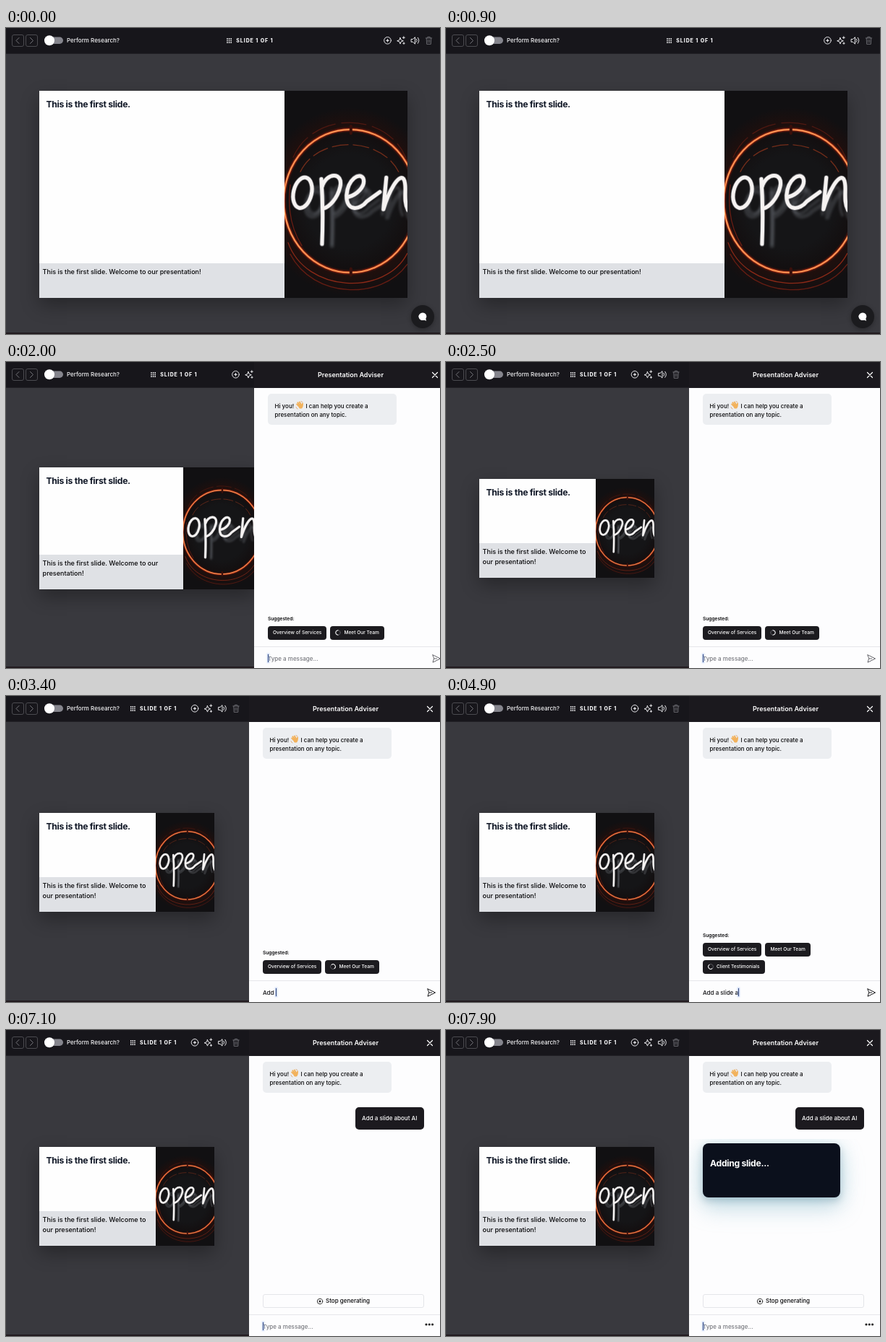
Recreate the animation shown at these times as an HTML page. Size 600 by 424 pixels, loop 8000 ms.

```html
<!DOCTYPE html>
<html lang="en">
<head>
<meta charset="utf-8">
<title>Slide editor with chat panel</title>
<style>
html, body { margin: 0; width: 100%; height: 100%; overflow: hidden; }
body { background: #39393e; font: 450 8px/12px Inter, "Liberation Sans", sans-serif; color: #08080a; }
#stage { position: absolute; left: 0; top: 0; width: 600px; height: 424px; overflow: hidden; background: #39393e; }
#stage div, #stage svg.abs { position: absolute; white-space: nowrap; }
svg { fill: none; stroke-linecap: round; stroke-linejoin: round; overflow: visible; }
#bar { left: 0; top: 0; width: 600px; height: 35px; background: #17161b; border-bottom: 1px solid #222126; color: #f4f4f6; }
.nav { top: 9px; width: 15px; height: 15px; border: 1px solid #4b4b50; border-radius: 3px; }
#count { left: 318.3px; top: 11.6px; font-weight: 800; font-size: 7px; letter-spacing: .92px; }
#grid { fill: #f4f4f6; }
#dots { fill: #222; }
#slide { left: 45.6px; background: #fefefe; box-shadow: 0 10px 24px rgba(0, 0, 0, .32); }
.title { font-weight: 700; font-size: 12.2px; line-height: 16px; letter-spacing: -.025em; }
#slide .title { left: 9.8px; top: 11px; color: #111827; }
#slide .caption { left: 0; bottom: 0; width: 66.67%; height: 48px; box-sizing: border-box; padding: 5px; background: #dfe1e5; font-size: 9.05px; line-height: 14.4px; white-space: normal; }
#photo { right: 0; top: 0; width: 33.33%; height: 100%; overflow: hidden; background: #0c0b0d; }
#photo svg { position: absolute; width: 100%; height: 100%; }
#floor { left: 0; top: 422px; width: 600px; height: 2px; background: #211a1e; }
#chat { left: 560px; top: 384px; width: 32px; height: 32px; border-radius: 50%; background: #1b1b1e; box-shadow: 0 2px 6px rgba(0, 0, 0, .3); }
#panel { left: 336px; top: 0; width: 267px; height: 424px; background: #fdfdfe; }
#head { left: 0; top: 0; width: 267px; height: 36px; background: #1b191e; color: #fff; font-weight: 600; font-size: 9px; line-height: 35px; text-align: center; }
#hello { left: 19px; top: 44px; width: 178px; height: 43px; border-radius: 5px; background: #eceef1; }
#hello p { margin: 10px 0 0 9.5px; }
#hello svg { vertical-align: -2.5px; }
#suggest { left: 19px; bottom: 39.5px; width: 225px; font-size: 6.6px; }
#suggest b { display: block; font-weight: 600; line-height: 10px; margin-bottom: 4.5px; }
#stage #chips { position: static; display: flex; flex-wrap: wrap; gap: 5px; }
.chip { display: flex; align-items: center; height: 19px; padding: 0 7px; border-radius: 4px; background: #1c1b1f; color: #fff; font-weight: 500; }
.chip svg { margin-right: 4px; }
#line { left: 0; top: 394px; width: 267px; height: 1px; background: #e6e7ea; }
#input { left: 19px; top: 404.5px; white-space: pre !important; }
#caret { top: 405px; width: 1px; height: 11px; background: #3c4b78; box-shadow: 0 0 2px 1px rgba(120, 160, 240, .5); }
#ask { left: 146.5px; top: 107px; width: 95.5px; height: 31px; border-radius: 5px; background: #1c1a1f; color: #fff; line-height: 31px; text-align: center; }
#clip { left: 0; top: 151px; width: 264px; height: 160px; overflow: hidden; }
#card { left: 19px; top: 6px; width: 190px; height: 75px; border-radius: 8px; background: #0b101c; color: #fff; }
#card .title { left: 10px; top: 20px; }
#stop { left: 19px; top: 366px; width: 221px; height: 17px; border: 1px solid #e4e5e9; border-radius: 3px; font-weight: 500; line-height: 17px; }
#stop span { position: absolute; left: 86px; }
</style>
</head>
<body>
<div id="stage">
  <div id="bar">
    <div class="nav" style="left:8px"></div>
    <div class="nav" style="left:27px"></div>
    <svg class="abs" width="90" height="36" stroke="#77777d" style="left:0;top:0">
      <path d="M18 13.5l-4 4 4 4M33.5 13.5l4 4-4 4"/>
      <rect x="53.5" y="12.5" width="25.5" height="9.5" rx="4.75" fill="#85858d" stroke="none"/>
      <circle cx="60" cy="17.2" r="7" fill="#fff" stroke="none"/>
    </svg>
    <div style="left:84px;top:11px;font-weight:500">Perform Research?</div>
    <div id="middle" style="left:0;top:0">
      <svg class="abs" id="grid" width="8" height="8" style="left:304.5px;top:14px"></svg>
      <div id="count">SLIDE 1 OF 1</div>
    </div>
    <svg class="abs" id="tools" width="600" height="36" stroke="#e9e9ec" style="left:0;top:0">
      <circle cx="527.5" cy="17.3" r="4.8"/>
      <path d="M525.9 17.3h3.2M527.5 15.7v3.2" stroke-width="1.2"/>
      <path d="M545 13.5l1.2 3.1 3.1 1.2-3.1 1.2-1.2 3.1-1.2-3.1-3.1-1.2 3.1-1.2zM549.8 11.8v3M548.3 13.3h3M550 20v2.4M548.8 21.2h2.4"/>
      <path d="M560.5 15.5h2l3-2.8v9.4l-3-2.8h-2zM567.5 15.3q1.6 2 0 4M569.3 13.3q3.2 4 0 8"/>
      <path stroke="#68686e" d="M580.3 14h8.4M582.8 14v-1.6h3.4V14M581.2 14l.5 8.4h5.6l.5-8.4M583.4 16.3v3.8M585.6 16.3v3.8"/>
    </svg>
  </div>

  <div id="slide">
    <div class="title">This is the first slide.</div>
    <div class="caption">This is the first slide. Welcome to our presentation!</div>
    <div id="photo">
      <svg viewBox="0 0 170 287" preserveAspectRatio="none">
        <defs>
          <radialGradient id="dusk"><stop offset=".5" stop-color="#151517"/><stop offset=".72" stop-color="#130f10"/><stop offset=".8" stop-color="#1f0f0d"/><stop offset="1" stop-color="#111012"/></radialGradient>
          <filter id="soft"><feGaussianBlur stdDeviation="1.6"/></filter>
          <g id="sign">
            <ellipse cx="25" cy="141" rx="12.5" ry="21.5" transform="rotate(13 25 141)"/>
            <path d="M51 122Q54 165 52 212M52 133C58 112 82 112 77 133C73 150 62 160 54 163M88 147C100 144 113 132 109 121C104 112 88 122 86 144C85 167 104 166 114 153L132 140M141 120L137 164C144 140 158 114 165 122C171 132 163 150 171 165"/>
          </g>
        </defs>
        <path fill="#111012" d="M0 0h170v287H0z"/>
        <ellipse cx="90" cy="153" rx="122" ry="130" fill="url(#dusk)"/>
        <g stroke="#8f2414" stroke-width="1.3">
          <path d="M12 92C40 28 140 28 168 92" stroke-dasharray="34 9" opacity=".45"/>
          <path d="M22 112C46 62 132 62 158 112" stroke="#b5401f" stroke-dasharray="22 7" opacity=".6"/>
          <path d="M5 210C30 280 140 284 170 225" stroke="#a8301a" opacity=".8"/>
          <path d="M8 226C40 288 134 290 170 240" opacity=".65"/>
          <path d="M8 130Q2 180 24 214" opacity=".7"/>
        </g>
        <ellipse cx="91" cy="152.5" rx="92" ry="99" stroke="#7a1c0c" stroke-width="7" opacity=".35"/>
        <ellipse cx="91" cy="152.5" rx="92" ry="99" stroke="#d24a26" stroke-width="3.2"/>
        <ellipse cx="91" cy="152.5" rx="92" ry="99" stroke="#ffb468" stroke-width="1.2"/>
        <path d="M92 49v10M92 246v9" stroke="#3a100b" stroke-width="4"/>
        <g filter="url(#soft)" stroke="#74797f">
          <use href="#sign" stroke-width="7" opacity=".3" transform="translate(19 41) scale(.9 .82)"/>
          <use href="#sign" stroke-width="5" opacity=".3" transform="translate(23 30) scale(.82 .86)"/>
        </g>
        <use href="#sign" stroke="#a9a9ad" stroke-width="6.6" opacity=".5"/>
        <use href="#sign" stroke="#f6f3f2" stroke-width="5"/>
      </svg>
    </div>
  </div>
  <div id="floor"></div>

  <div id="chat">
    <svg class="abs" width="32" height="32" style="left:0;top:0"><path fill="#fff" d="M16 10.5a5.7 5.3 0 1 0 2 10.3l3.2.9-.9-2.7A5.7 5.3 0 0 0 16 10.5z"/></svg>
  </div>

  <div id="panel">
    <div id="head">Presentation Adviser</div>
    <svg class="abs" width="8" height="8" stroke="#fff" stroke-width="1.2" style="left:246px;top:13.5px"><path d="M.5.5l7 7M7.5.5l-7 7"/></svg>
    <div id="hello"><p>Hi you! <svg width="12" height="12" stroke="#f2b25c" stroke-width="2"><path d="M2.2 4.5l4 4M3.4 2.4l4 5M5.8 1.6l3 5M10 3.8l-.4 3.6"/><circle cx="7.4" cy="8" r="2.6" fill="#f2b25c" stroke="none"/><path stroke="#d98f45" stroke-width=".7" d="M8 .6q1.6.4 2.2 1.6M1 8.6q.4 1.6 2 2.4"/></svg> I can help you create a<br>presentation on any topic.</p></div>
    <div id="ask">Add a slide about AI</div>
    <div id="clip"><div id="card"><div class="title">Adding slide...</div></div></div>
    <div id="stop">
      <svg class="abs" width="10" height="10" stroke="#222" style="left:72.5px;top:4px"><circle cx="5" cy="5" r="3.7" stroke-width=".9"/><rect x="3.7" y="3.7" width="2.6" height="2.6" fill="#222" stroke="none"/></svg>
      <span>Stop generating</span>
    </div>
    <div id="suggest"><b>Suggested:</b><div id="chips"></div></div>
    <div id="line"></div>
    <div id="input"></div>
    <div id="caret"></div>
    <svg class="abs" id="send" width="12" height="12" style="left:246px;top:405px"><path d="M1 .8L11.5 6 1 11.2l1.6-5.2zM2.6 6h4"/></svg>
    <svg class="abs" id="dots" width="14" height="4" style="left:242.5px;top:405.5px"><circle cx="2" cy="2" r="1.6"/><circle cx="6.3" cy="2" r="1.6"/><circle cx="10.6" cy="2" r="1.6"/></svg>
  </div>

  <svg class="abs" id="pointer" width="40" height="40" style="left:0;top:0">
    <circle id="halo" r="18" fill="rgba(255,255,255,.04)" stroke="rgba(225,225,230,.35)" stroke-width="1.4"/>
    <path fill="#fff" stroke="#111" stroke-width=".7" d="M-.8 0q.9-.9 1.8 0v3.4l3.2.8q1 .4.8 1.6l-.6 3H.2l-2.4-3.2q-.2-1 1.4-.4z"/>
  </svg>
</div>

<script>
const $ = id => document.getElementById(id);
const LOOP = 8000, STEP = 100;
const MESSAGE = "Add a slide about AI";
const SENT = 6800, CARD = 7400, OPEN = 1900, MORE = 4000;

// [time, value] pairs, joined linearly
const squeeze = [[1800, 0], [1900, 60], [2000, 210], [2100, 255], [2200, 266.5]];
const drift = [[1800, 267], [1900, 130], [2000, 7], [2100, 1], [2200, 0]];
const typed = [[2800, 0], [3400, 4], [4900, 13], [5400, 16], [6200, 20]];
const mouseX = [[1400, 604], [1700, 581], [1800, 580]];
const mouseY = [[1400, 432], [1700, 405], [1800, 404]];

function at(keys, t) {
  if (t <= keys[0][0]) return keys[0][1];
  for (let i = 1; i < keys.length; i++) {
    const [a, u] = keys[i - 1], [b, v] = keys[i];
    if (t <= b) return u + (v - u) * (t - a) / (b - a);
  }
  return keys[keys.length - 1][1];
}

const show = (id, on) => { $(id).style.visibility = on ? "visible" : "hidden"; };
const move = (id, x, y = 0) => { $(id).style.transform = `translate(${x}px,${y}px)`; };

for (let i = 0; i < 9; i++) {
  $("grid").innerHTML += `<circle cx="${1 + i % 3 * 2.6}" cy="${1 + Math.floor(i / 3) * 2.6}" r=".9"/>`;
}

const spinner = `<svg class="spin" width="8" height="8" stroke-width="1"><circle cx="4" cy="4" r="3.3" stroke="#55555b"/><path d="M4 .7A3.3 3.3 0 0 0 4 7.3" stroke="#fff"/></svg>`;
let chipCount = 0;
function setChips(n) {
  if (n === chipCount) return;
  chipCount = n;
  $("chips").innerHTML = ["Overview of Services", "Meet Our Team", "Client Testimonials"].slice(0, n)
    .map((name, i) => `<span class="chip">${i === n - 1 ? spinner : ""}${name}</span>`).join("");
}

function drawSlide(t) {
  const s = at(squeeze, t), w = 509.3 - s, h = w * .5645;
  Object.assign($("slide").style, { width: w + "px", height: h + "px", top: 230.5 - h / 2 + "px" });
  move("middle", -s / 2);
  move("tools", -s);
}

function drawPanel(t) {
  const sent = t >= SENT;
  const text = sent ? "" : MESSAGE.slice(0, Math.floor(at(typed, t) + 1e-6));
  show("panel", t >= OPEN);
  move("panel", at(drift, t));
  $("input").textContent = text || "Type a message...";
  $("input").style.color = text ? "#111114" : "#77787e";
  $("caret").style.left = 19 + (text ? $("input").offsetWidth : 0) + "px";
  $("send").style.stroke = text ? "#18181b" : "#66666c";

  setChips(t < MORE ? 2 : 3);
  document.querySelector(".spin").style.transform = `rotate(${t * .36}deg)`;
  $("suggest").style.display = sent ? "none" : "block";
  $("send").style.display = sent ? "none" : "block";
  for (const id of ["ask", "stop", "dots"]) $(id).style.display = sent ? "block" : "none";

  $("clip").style.display = t >= CARD ? "block" : "none";
  const glow = .34 + .06 * Math.sin((t - CARD) / 500 * Math.PI / 2);
  $("card").style.boxShadow = `0 14px 32px rgba(110,170,190,${glow}), 0 0 24px rgba(150,205,220,.3), 0 5px 10px rgba(30,60,80,.22)`;
}

function drawPointer(t) {
  show("pointer", t >= 1400 && t < OPEN);
  show("chat", t < OPEN);
  $("halo").style.display = t >= 1800 ? "block" : "none";
  move("pointer", at(mouseX, t), at(mouseY, t));
}

const start = performance.now();
function frame() {
  const t = Math.floor((performance.now() - start) % LOOP / STEP) * STEP;
  drawSlide(t);
  drawPanel(t);
  drawPointer(t);
  requestAnimationFrame(frame);
}
frame();
</script>
</body>
</html>
```
